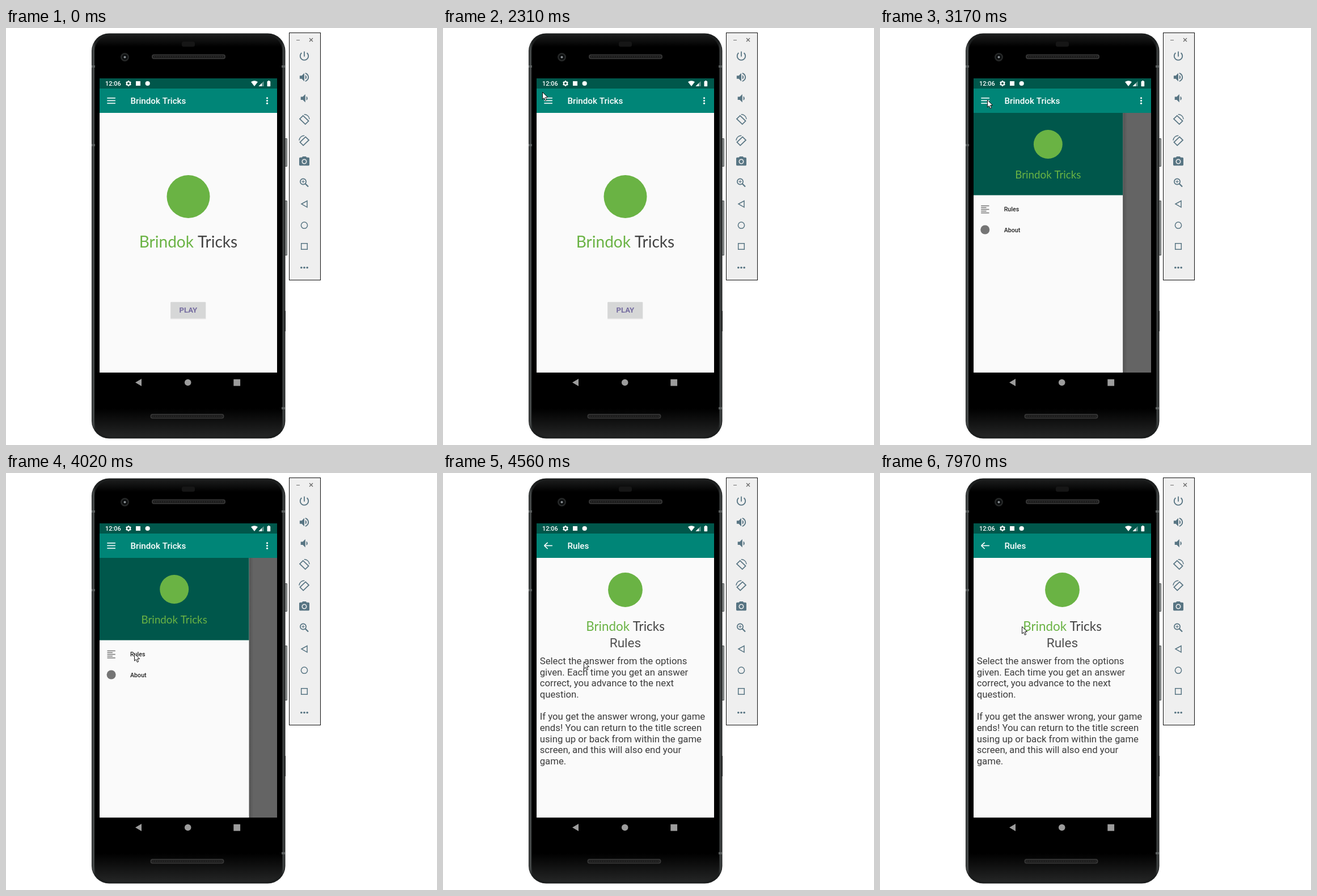
An HTML page with a canvas that plays this animation: 760 by 737 pixels, repeating every 8000 ms.

```html
<!DOCTYPE html>
<html lang="en">
<head>
<meta charset="utf-8">
<title>Quiz app navigation</title>
<style>
html, body { margin: 0; width: 100%; height: 100%; overflow: hidden; background: #fff; }
canvas { display: block; width: 760px; height: 737px; }
</style>
</head>
<body>
<canvas id="stage"></canvas>
<script>
const W = 760, H = 737, LOOP = 8000, TICK = 77.7, LEAD = 130;
const APP = ['Brindok', 'Tricks'];
const GREEN = '#6ab344', TEAL = '#008577', DARK = '#00574b', PAPER = '#fafafa', SLATE = '#587583';
const ROBOTO = 'Roboto, sans-serif', LATO = 'Lato, sans-serif';

const canvas = document.getElementById('stage');
const ctx = canvas.getContext('2d');
const dpr = window.devicePixelRatio || 1;
canvas.width = W * dpr;
canvas.height = H * dpr;

const clamp = v => Math.min(1, Math.max(0, v));
const lerp = (a, b, u) => a + (b - a) * u;
const smooth = u => u * u * (3 - 2 * u);
const settle = u => 1 - Math.pow(1 - clamp(u), 5);

// Pointer keys: tick, x, y
const POINTER = [
  [0, 604, 701], [4, 398, 344], [9, 398, 344], [17, 229, 150], [19, 229, 150],
  [23, 156, 92], [26, 170, 111], [27, 170, 111], [28, 175, 113], [30, 189, 127],
  [39, 189, 127], [44, 215, 297], [48, 225, 318], [49, 225, 318], [52, 229, 322],
  [57, 248, 333], [91, 248, 333], [96, 250, 282], [97, 250, 282], [101, 250, 271]
];

const RULES = [
  'Select the answer from the options', 'given. Each time you get an answer',
  'correct, you advance to the next', 'question.', '',
  'If you get the answer wrong, your game', 'ends! You can return to the title screen',
  'using up or back from within the game', 'screen, and this will also end your', 'game.'
];

const ICON = {
  power: 'M13 3h-2v10h2V3zm4.83 2.17l-1.42 1.42C17.99 7.86 19 9.81 19 12c0 3.87-3.13 7-7 7s-7-3.13-7-7c0-2.19 1.01-4.14 2.58-5.42L6.17 5.17C4.23 6.82 3 9.26 3 12c0 4.97 4.03 9 9 9s9-4.03 9-9c0-2.74-1.23-5.18-3.17-6.83z',
  louder: 'M3 9v6h4l5 5V4L7 9H3zm13.5 3c0-1.77-1.02-3.29-2.5-4.03v8.05c1.48-.73 2.5-2.25 2.5-4.02zM14 3.23v2.06c2.89.86 5 3.54 5 6.71s-2.11 5.85-5 6.71v2.06c4.01-.91 7-4.49 7-8.77s-2.99-7.86-7-8.77z',
  softer: 'M18.5 12c0-1.77-1.02-3.29-2.5-4.03v8.05c1.48-.73 2.5-2.25 2.5-4.02zM5 9v6h4l5 5V4L9 9H5z',
  camera: 'M9 2L7.17 4H4c-1.1 0-2 .9-2 2v12c0 1.1.9 2 2 2h16c1.1 0 2-.9 2-2V6c0-1.1-.9-2-2-2h-3.17L15 2H9zm3 15c-2.76 0-5-2.24-5-5s2.24-5 5-5 5 2.24 5 5-2.24 5-5 5z'
};

function rect(x, y, w, h, fill) {
  ctx.fillStyle = fill;
  ctx.fillRect(x, y, w, h);
}
function round(x, y, w, h, r, fill) {
  ctx.beginPath();
  ctx.roundRect(x, y, w, h, r);
  ctx.fillStyle = fill;
  ctx.fill();
}
function disc(x, y, r, fill) {
  ctx.beginPath();
  ctx.arc(x, y, r, 0, 7);
  ctx.fillStyle = fill;
  ctx.fill();
}
function ring(x, y, r, color, width) {
  ctx.beginPath();
  ctx.arc(x, y, r, 0, 7);
  ctx.strokeStyle = color;
  ctx.lineWidth = width;
  ctx.stroke();
}
function trace(points, close) {
  ctx.beginPath();
  points.forEach(([x, y]) => ctx.lineTo(x, y));
  if (close) ctx.closePath();
}
function poly(points, fill) {
  trace(points, true);
  ctx.fillStyle = fill;
  ctx.fill();
}
function line(points, color, width, close) {
  trace(points, close);
  ctx.strokeStyle = color;
  ctx.lineWidth = width;
  ctx.stroke();
}
function text(str, x, y, font, fill, align = 'left') {
  ctx.font = font;
  ctx.fillStyle = fill;
  ctx.textAlign = align;
  ctx.fillText(str, x, y);
}
function place(x, y, scale, draw) {
  ctx.save();
  ctx.translate(x, y);
  ctx.scale(scale, scale);
  draw();
  ctx.restore();
}
function icon(name, y) {
  place(526 - 10.8, y - 10.8, 0.9, () => {
    ctx.fillStyle = SLATE;
    ctx.fill(new Path2D(ICON[name]));
  });
}
function gradient(x0, y0, x1, y1, stops) {
  const g = ctx.createLinearGradient(x0, y0, x1, y1);
  stops.forEach(([at, color]) => g.addColorStop(at, color));
  return g;
}

function phone() {
  [[195, 50], [305, 97]].forEach(([y, h]) => {
    round(490, y, 6, h, 1, '#4a4e4e');
    rect(492.5, y + 1, 2.5, h - 2, '#969a9a');
  });
  rect(490, 500, 3, 36, '#2b2d2d');
  round(151, 9.5, 341.5, 716, 31, '#1b1d1d');
  round(152, 10.5, 339.5, 714, 30, gradient(152, 0, 491.5, 0, [
    [0, '#3a3d3d'], [0.006, '#4c5050'], [0.015, '#1c1e1e'],
    [0.985, '#1c1e1e'], [0.994, '#414545'], [1, '#2a2c2c']
  ]));
  round(156.5, 12.5, 330.5, 710, 28, gradient(0, 12, 0, 722, [
    [0, '#1c1d1d'], [0.03, '#000'], [0.93, '#000'], [1, '#242525']
  ]));
  [[151, 68], [151, 207], [486, 68], [486, 672]].forEach(([x, y]) => rect(x, y - 2, 6, 4, '#595d5d'));
  round(310, 24, 23, 9, 3, '#161616');
  disc(209.5, 51.5, 7.5, '#262828');
  disc(209.5, 51.5, 5, '#0c0e0f');
  disc(209.5, 51.5, 2, '#8a9094');
  [[257, 46.5], [254.5, 682]].forEach(([x, y]) => {
    round(x, y, 130, 8.5, 4, '#353535');
    round(x + 2, y + 1.8, 126, 5, 2.5, '#1c1c1c');
    for (let i = 4; i < 126; i += 4) rect(x + i, y + 3, 2, 2.5, '#292929');
  });
  poly([[228, 626.5], [239, 620], [239, 633]], '#9c9c9c');
  disc(320.7, 626.5, 5.8, '#9c9c9c');
  rect(401.3, 620.8, 11.8, 11.8, '#9c9c9c');
}

function rotateIcon(y, side) {
  ctx.save();
  ctx.translate(526, y);
  ctx.scale(side, 1);
  line([[-8, -0.8], [-2.2, -6.6], [7.6, 2.8], [1.8, 8.6]], SLATE, 1.7, true);
  ctx.beginPath();
  ctx.arc(0, 0.5, 9.2, -1.6, -0.1);
  ctx.lineWidth = 1.4;
  ctx.stroke();
  ctx.restore();
}

function panel() {
  rect(499, 8, 56, 438, '#111');
  rect(500, 9, 54, 436, '#efefef');
  line([[512, 21.5], [518, 21.5]], '#777', 1.1);
  line([[535, 18], [541, 24]], '#666', 1.2);
  line([[541, 18], [535, 24]], '#666', 1.2);
  icon('power', 49.5);
  icon('louder', 87);
  icon('softer', 124.3);
  rotateIcon(161.5, 1);
  rotateIcon(199, -1);
  icon('camera', 236);
  disc(526, 236, 2.9, SLATE);
  ring(524, 271.5, 5.1, SLATE, 1.7);
  line([[527.8, 275.3], [533, 280.5]], SLATE, 2.2);
  line([[521.3, 271.5], [526.7, 271.5]], SLATE, 1.1);
  line([[524, 268.8], [524, 274.2]], SLATE, 1.1);
  line([[521, 311], [531, 305.5], [531, 316.8]], SLATE, 1.5, true);
  ring(526, 348.7, 5.6, SLATE, 1.5);
  line([[520.7, 380.7], [531.3, 380.7], [531.3, 391.3], [520.7, 391.3]], SLATE, 1.5, true);
  [520.8, 526, 531.2].forEach(x => disc(x, 423.5, 1.8, SLATE));
}

function statusBar() {
  rect(165, 89, 313, 18, DARK);
  text('12:06', 175, 102.2, '500 10.9px ' + ROBOTO, '#fff');
  ring(216, 98, 3.1, '#fff', 2);
  for (let i = 0; i < 6; i++) {
    const a = i * Math.PI / 3 + Math.PI / 6;
    const c = Math.cos(a), s = Math.sin(a);
    line([[216 + 3 * c, 98 + 3 * s], [216 + 5 * c, 98 + 5 * s]], '#fff', 2.1);
  }
  rect(229, 94, 8, 8, '#fff');
  disc(249.7, 98, 4.1, '#fff');
  ctx.beginPath();
  ctx.moveTo(438, 103);
  ctx.lineTo(432, 95.3);
  ctx.quadraticCurveTo(438, 91, 444, 95.3);
  ctx.fillStyle = '#fff';
  ctx.fill();
  poly([[445.5, 103], [454.5, 103], [454.5, 94]], 'rgba(255,255,255,.4)');
  poly([[445.5, 103], [451, 103], [451, 97.5]], '#fff');
  round(460.5, 94, 5.7, 9.2, 0.8, '#fff');
  rect(462, 93, 2.7, 1.5, '#fff');
}

function menuIcon(a) {
  ctx.save();
  ctx.translate(185.6, 128.4);
  ctx.rotate(Math.PI * a);
  line([[-7.3, 0], [lerp(7.3, 6.3, a), 0]], '#fff', 1.6);
  [-1, 1].forEach(side => line([
    [lerp(-7.3, 1, a), side * lerp(4.6, 5.6, a)], [lerp(7.3, 7, a), side * lerp(4.6, 0, a)]
  ], '#fff', 1.6));
  ctx.restore();
}

function appBar(q, onRules) {
  rect(165, 107, 313, 43, TEAL);
  if (q > 2600 && q < 3120) {
    const r = q < 2760 ? 10.3 : 14.2;
    disc(186.8, 127.6, r, `rgba(255,255,255,${0.2 * (1 - clamp((q - 2860) / 260))})`);
  }
  menuIcon(smooth(clamp((q - 4047) / 300)));
  text(onRules ? 'Rules' : APP.join(' '), 219.5, 134.2, '500 15.2px ' + ROBOTO, '#fff');
  if (!onRules) [123.8, 128.5, 133.2].forEach(y => disc(460.5, y, 1.6, '#fff'));
}

// Emblem and two-tone app name; y is the emblem centre.
function brand(x, y, scale, second) {
  place(x, y, scale, () => {
    disc(0, 0, 38, GREEN);
    const font = '28px ' + LATO;
    ctx.font = font;
    const full = ctx.measureText(APP.join(' ')).width;
    const head = ctx.measureText(APP[0] + ' ').width;
    text(APP[0], -full / 2, 90, font, GREEN);
    text(APP[1], head - full / 2, 90, font, second);
  });
}

function home() {
  brand(321.5, 298, 1, '#424242');
  rect(290, 485, 62.5, 29.5, '#e3e3e3');
  round(290.3, 484.3, 61.7, 28.7, 1, '#d6d7d7');
  text('PLAY', 321.3, 503.3, 'bold 13.2px ' + ROBOTO, '#756ca0', 'center');
}

function rules() {
  brand(321.5, 206.5, 0.8, '#424242');
  text('Rules', 321.5, 307.5, '22.6px ' + ROBOTO, '#505050', 'center');
  RULES.forEach((s, i) => text(s, 170.7, 338 + i * 19.67, '16.75px ' + ROBOTO, '#3c3c3c'));
}

function drawer(p) {
  const edge = 165 + 263.5 * p;
  rect(edge, 150, 8, 459, gradient(edge, 0, edge + 8, 0, [[0, 'rgba(0,0,0,.17)'], [1, 'rgba(0,0,0,0)']]));
  ctx.save();
  ctx.translate(edge - 428.5, 0);
  rect(165, 150, 263.5, 459, PAPER);
  rect(165, 150, 263.5, 145.5, DARK);
  brand(296.7, 205.5, 0.67, GREEN);
  for (let i = 0; i < 5; i++) rect(178.5, 313.6 + i * 3.1, i % 2 ? 9.5 : 14.3, 1.5, '#757575');
  disc(185.6, 356.5, 8, '#757575');
  text('Rules', 219, 324.2, '500 10.65px ' + ROBOTO, '#212121');
  text('About', 219, 360.7, '500 10.65px ' + ROBOTO, '#212121');
  ctx.restore();
}

const drawerAt = q => q < 3700 ? settle((q - 2785) / 512) : 1 - settle((q - 4016) / 512);

function screen(q) {
  const fade = clamp((q - 4050) / 220);
  ctx.save();
  ctx.beginPath();
  ctx.rect(165, 89, 313, 520);
  ctx.clip();
  rect(165, 150, 313, 459, PAPER);
  if (fade > 0) {
    ctx.globalAlpha = fade;
    rules();
  }
  if (fade < 1) {
    ctx.globalAlpha = 1 - fade;
    home();
  }
  ctx.globalAlpha = 1;
  rect(165, 150, 313, 459, `rgba(0,0,0,${0.6 * drawerAt(q - 20)})`);
  const p = drawerAt(q);
  if (p > 0.002) drawer(p);
  appBar(q, q > 4047);
  statusBar();
  ctx.restore();
}

function pointer(tick) {
  let i = 0;
  while (i < POINTER.length - 2 && POINTER[i + 1][0] <= tick) i++;
  const [k0, x0, y0] = POINTER[i], [k1, x1, y1] = POINTER[i + 1];
  const u = smooth(clamp((tick - k0) / (k1 - k0)));
  place(lerp(x0, x1, u), lerp(y0, y1, u), 1, () => {
    const arrow = [[0.5, 0.5], [0.5, 13], [3.4, 10.4], [5.4, 15.3], [7.6, 14.3], [5.6, 9.6], [9.6, 9.4]];
    poly(arrow, '#fff');
    line(arrow, '#111', 1, true);
  });
}

function draw(now) {
  const t = now % LOOP;
  // The screen advances in fixed ticks.
  const tick = Math.floor((t - LEAD + 14) / TICK);
  ctx.setTransform(dpr, 0, 0, dpr, 0, 0);
  rect(0, 0, W, H, '#fff');
  phone();
  panel();
  screen(LEAD + tick * TICK);
  if (t >= LEAD) pointer(tick);
}

const start = performance.now();
function loop() {
  draw(performance.now() - start);
  requestAnimationFrame(loop);
}
loop();
</script>
</body>
</html>
```
